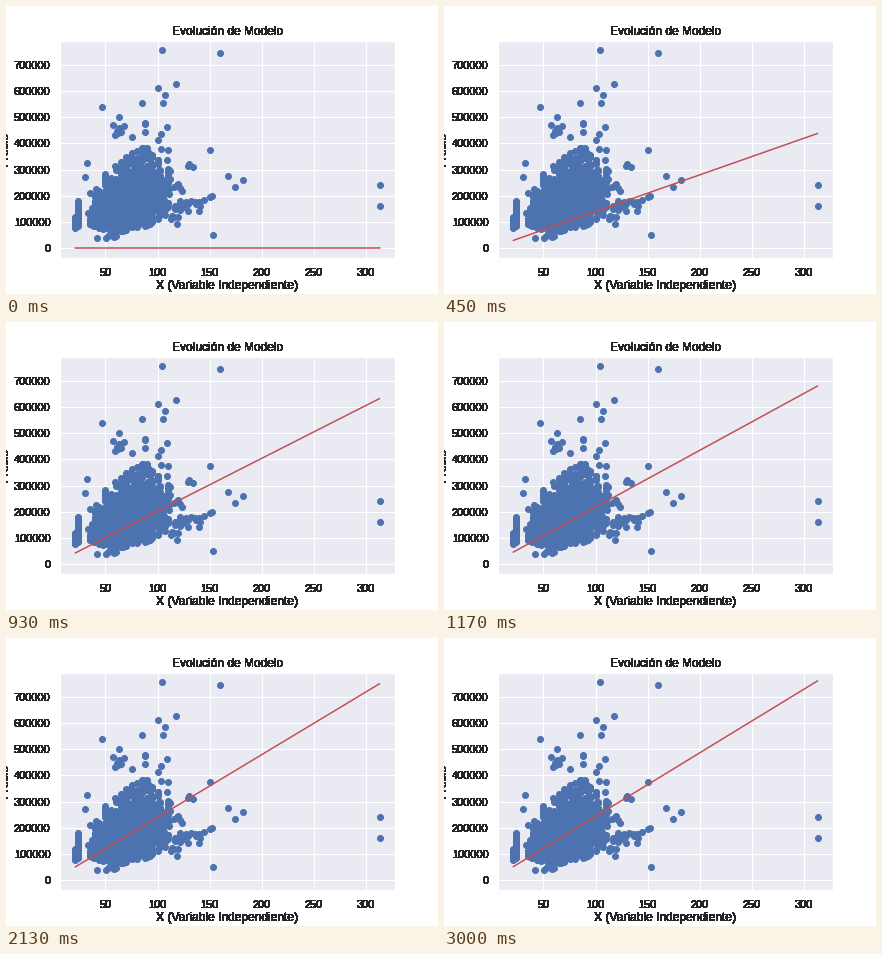
A matplotlib script for the animation above (3.03 s loop, 432x288 px).

```python
import numpy as np
import matplotlib.pyplot as plt
from matplotlib.animation import FuncAnimation

FRAMES, INTERVAL = 101, 30
SLOPE, RATE = 2440, 0.0568
X_MIN, X_MAX, Y_MAX = 21, 313, 755000
INK = "#262626"

plt.rcParams.update({
    "font.family": "Liberation Sans", "font.size": 12,
    "text.color": INK, "axes.labelcolor": INK,
    "xtick.labelcolor": INK, "ytick.labelcolor": INK,
    "axes.titlesize": 12, "axes.labelsize": 12, "axes.labelpad": 3,
    "xtick.labelsize": 11, "ytick.labelsize": 11,
    "axes.facecolor": "#EAEAF2", "axes.edgecolor": "white",
    "axes.linewidth": 1.25, "axes.axisbelow": True, "axes.grid": True,
    "grid.color": "white", "grid.linewidth": 1, "grid.linestyle": "-",
    "xtick.bottom": False, "ytick.left": False,
    "xtick.major.size": 6, "ytick.major.size": 6,
    "lines.solid_capstyle": "round",
})

# Isolated points: (x, price in thousands)
KEY_POINTS = [
    (104, 755), (160, 745), (118, 625), (100, 611), (107, 583), (105, 555),
    (85, 556), (47, 538), (63, 500), (32, 325), (30, 271), (150, 375),
    (168, 274), (174, 235), (182, 260), (313, 242), (313, 160), (153, 52),
]


def make_points():
    rng = np.random.default_rng(7)

    def patch(n, x_range, price_range):
        return np.column_stack([rng.uniform(*x_range, n).round(),
                                rng.uniform(*price_range, n)])

    # Main cloud: round widths are more common, prices are log-normal
    x = rng.normal(73, 19, 1250).round()
    x[::2] = 5 * (x[::2] / 5).round()
    price = 170 * (x.clip(20) / 70) ** 0.6 * np.exp(rng.normal(0, 0.38, x.size))
    top = np.minimum(150 + 2.9 * x, 395)
    low = 62 + 0.03 * (x - 65) ** 2
    keep = (x > 32) & (x < 113) & (price > low) & (price < top)

    return np.vstack([
        np.column_stack([x[keep], price[keep]]),
        [(21, p) for p in np.linspace(75, 120, 12)],
        [(24, p) for p in np.linspace(85, 180, 19)],
        patch(14, (48, 112), (400, 480)),
        patch(7, (40, 62), (35, 60)),
        patch(14, (113, 122), (80, 250)),
        patch(16, (122, 152), (140, 220)),
        patch(3, (128, 135), (310, 323)),
        KEY_POINTS,
    ]) * [1, 1000]


def solid(image, dpi):
    """Turn soft text edges fully opaque."""
    image[..., 3] = image[..., 3] > 0
    return image, 0, 0


fig, ax = plt.subplots(figsize=(6, 4), dpi=72, facecolor="white")
fig.subplots_adjust(left=0.125, right=0.9, bottom=0.125, top=0.88)

x, y = make_points().T
ax.scatter(x, y, s=36, color="#4C72B0", linewidth=1, zorder=2)
line, = ax.plot([X_MIN, X_MAX], [0, 0], color="#C44E52", lw=1.5, zorder=3)

x_pad, y_pad = 0.05 * (X_MAX - X_MIN), 0.05 * Y_MAX
ax.set(xlim=(X_MIN - x_pad, X_MAX + x_pad), ylim=(-y_pad, Y_MAX + y_pad),
       xticks=range(50, 301, 50), yticks=range(0, 700001, 100000),
       title="Evolución de Modelo",
       xlabel="X (Variable Independiente)", ylabel="Precio")
ax.ticklabel_format(style="plain")

labels = [ax.title, ax.xaxis.label, ax.yaxis.label]
for label in labels + ax.get_xticklabels() + ax.get_yticklabels():
    label.set_agg_filter(solid)


def update(i):
    slope = SLOPE * (1 - np.exp(-RATE * i))
    line.set_ydata([slope * X_MIN, slope * X_MAX])
    return line,


anim = FuncAnimation(fig, update, frames=FRAMES, interval=INTERVAL, repeat=True)
plt.show()
```
